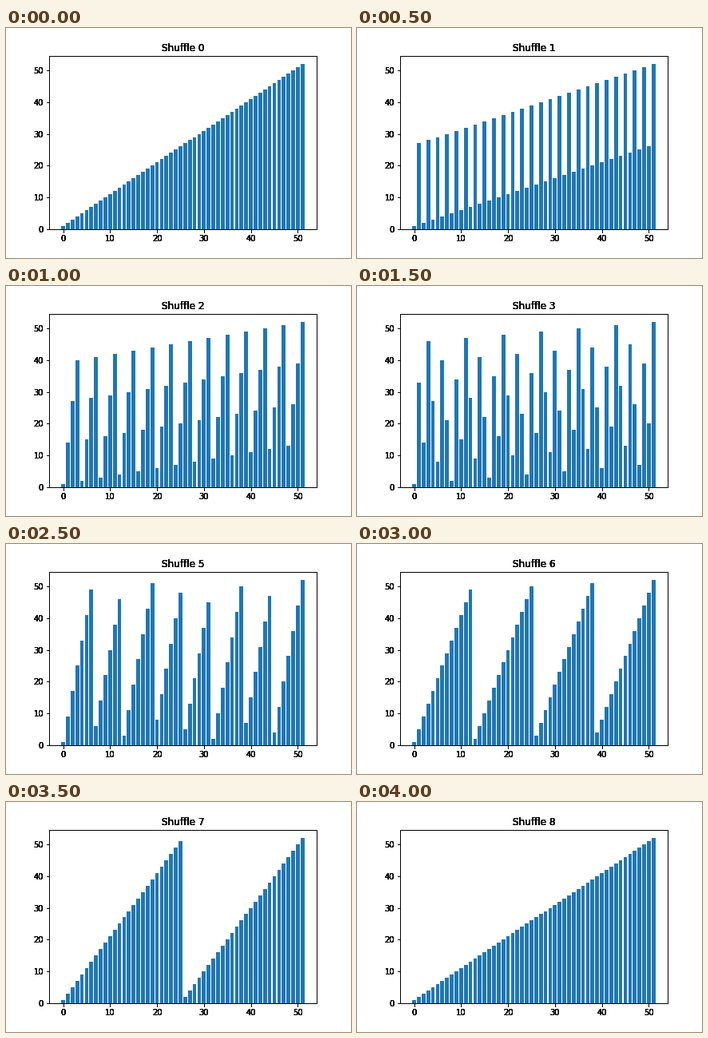
These frames come from a looping animation (432x288 px, 4500 ms). A matplotlib script:

```python
import numpy as np
import matplotlib.pyplot as plt
from matplotlib.animation import FuncAnimation

CARDS = 52
SHUFFLES = 8
LAYERS = 8  # stacked copies of the frame and labels give hard, dark edges

plt.rcParams["font.family"] = "DejaVu Sans"
plt.rcParams["font.size"] = 10


def shuffle(deck):
    """Perfect riffle that keeps the top card on top."""
    return np.column_stack(np.split(deck, 2)).ravel()


def deck_after(count):
    deck = np.arange(1, CARDS + 1)
    for _ in range(count):
        deck = shuffle(deck)
    return deck


fig = plt.figure(figsize=(6, 4), dpi=72, facecolor="white")
box = [0.125, 0.125, 0.775, 0.755]

ax = fig.add_axes(box, label="bars")
bars = ax.bar(np.arange(CARDS), deck_after(0), color="#1f77b4")
ax.set_xlim(ax.get_xlim())
ax.set_ylim(0, CARDS * 1.05)

layers = [ax]
for i in range(1, LAYERS):
    top = fig.add_axes(box, label=f"layer {i}")
    top.patch.set_visible(False)
    top.set_xlim(ax.get_xlim())
    top.set_ylim(ax.get_ylim())
    layers.append(top)

for layer in layers:
    layer.set_xticks(range(0, 51, 10))
    layer.set_yticks(range(0, 51, 10))
titles = [layer.set_title("Shuffle 0", fontsize=12) for layer in layers]


def update(count):
    for bar, value in zip(bars, deck_after(count)):
        bar.set_height(value)
    for title in titles:
        title.set_text(f"Shuffle {count}")
    return [*bars, *titles]


anim = FuncAnimation(fig, update, frames=SHUFFLES + 1, init_func=lambda: update(0),
                     interval=500, repeat=True, repeat_delay=0, blit=False)
plt.show()
```
